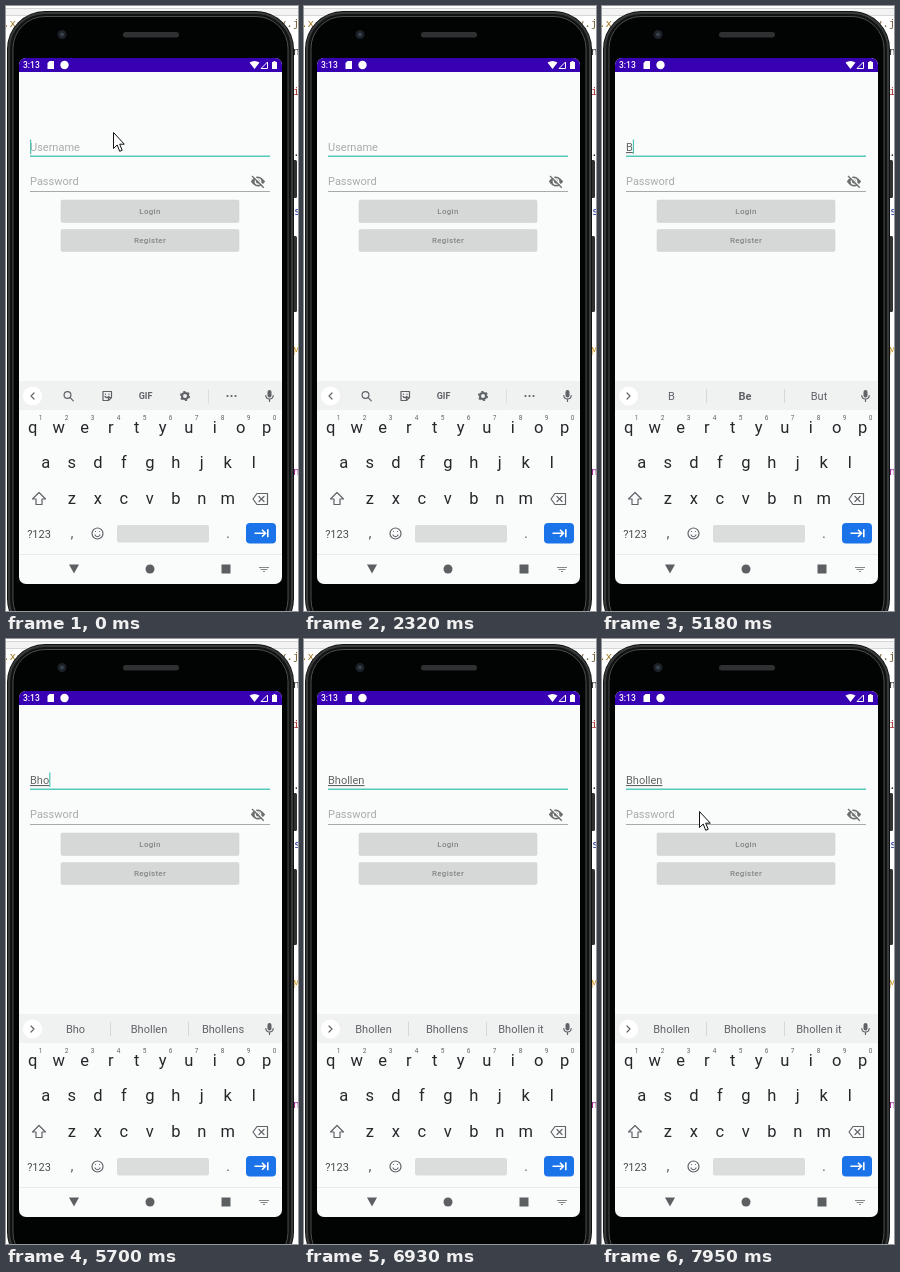
Recreate the animation shown at these times as an HTML page. Size 292 px wide and 605 px high, loop 8000 ms.

```html
<!DOCTYPE html>
<html lang="en">
<head>
<meta charset="utf-8">
<title>Login screen</title>
<style>
html, body { margin: 0; width: 100%; height: 100%; overflow: hidden; background: #fff; }
svg { display: block; width: 292px; height: 605px; font-family: Roboto, Arial, sans-serif; }
.mid { text-anchor: middle; }
.code { font: 11px "DejaVu Sans Mono", monospace; }
.line { fill: none; stroke: #5f6368; stroke-width: 1.2; stroke-linecap: round; stroke-linejoin: round; }
.btn { font-size: 8px; font-weight: 500; letter-spacing: .3px; fill: #858686; }
</style>
</head>
<body>
<svg viewBox="0 0 292 605">
  <defs>
    <clipPath id="screen"><rect x="13" y="52" width="263" height="526" rx="7"/></clipPath>
  </defs>

  <!-- editor behind the phone -->
  <rect width="292" height="605" fill="#fff"/>
  <rect y="2" width="292" height="7" fill="#f3f3f4"/>
  <path d="M0 2.500H292M0 9.500H292" stroke="#d5d6d8"/>
  <g class="code">
    <text x="-3" y="21" fill="#a07a28">.x</text>
    <text x="267" y="21" fill="#78643c">ty.j</text>
    <text x="287" y="49" fill="#333">n</text>
    <text x="287" y="89" fill="#a33">i</text>
    <text x="287" y="150" fill="#222">.</text>
    <text x="288" y="209" fill="#24359c">s</text>
    <text x="287" y="349" fill="#c99420">M</text>
    <text x="287" y="469" fill="#9b2393">n</text>
  </g>

  <!-- phone -->
  <rect x="286" y="154" width="5" height="38" rx="1.5" fill="#303232"/>
  <rect x="286" y="230" width="5" height="76" rx="1.5" fill="#303232"/>
  <rect x="1" y="5" width="287" height="626" rx="38" fill="#111212"/>
  <rect x="3" y="7" width="283" height="622" rx="36" fill="none" stroke="#37393a" stroke-width="2"/>
  <rect x="7" y="10.500" width="275" height="615" rx="32" fill="#020303" stroke="#4b4d4e"/>
  <circle cx="56" cy="28.500" r="4.500" fill="#1c2127"/>
  <circle cx="56" cy="28.500" r="2" fill="#37424d"/>
  <rect x="117" y="26" width="56" height="5.500" rx="2.700" fill="#2e3031"/>
  <g clip-path="url(#screen)">
    <rect x="13" y="52" width="263" height="526" fill="#fafcfb"/>
    <rect x="13" y="52" width="263" height="14" fill="#3700b3"/>
  </g>

  <!-- status bar -->
  <g fill="#fff">
    <text x="17" y="62" font-size="8.500" font-weight="500">3:13</text>
    <path d="M43.500 55H48V63H41.500V57Z"/>
    <circle cx="58.500" cy="59" r="4.200"/>
    <path d="M243.500 56.500Q248.500 53.500 253.500 56.500L248.500 63ZM266 56H267.500V55H269.500V56H271V63H266Z"/>
    <path d="M261.500 56V62.500H255Z" fill="none" stroke="#fff"/>
  </g>

  <!-- form -->
  <text id="user" x="24" y="145" font-size="11"/>
  <path d="M24 150.300H264" stroke="#55c9ba" stroke-width="1.400"/>
  <rect id="caret" y="133.500" width="1.200" height="14.500" fill="#4fc4b3"/>
  <text x="24" y="179" font-size="11" fill="#a9abab">Password</text>
  <path d="M24 185.500H264" stroke="#a8aaaa"/>
  <g fill="#6d6f6f">
    <path d="M244.800 175.500Q252 165.500 259.200 175.500Q252 185.500 244.800 175.500Z"/>
    <circle cx="252" cy="175.500" r="2.700" stroke="#fafcfb" stroke-width="1.300"/>
    <path d="M247 169.200L259 181.200" stroke="#fafcfb" stroke-width="1.300"/>
    <path d="M246 170L257.800 181.800" stroke="#6d6f6f" stroke-width="1.300"/>
  </g>
  <g fill="#d6d8d7" stroke="#cfd1d1" stroke-width=".5">
    <rect x="55" y="194" width="178" height="22.500" rx="1.500"/>
    <rect x="55" y="223.500" width="178" height="22" rx="1.500"/>
  </g>
  <text class="mid btn" x="144" y="208">Login</text>
  <text class="mid btn" x="144" y="237">Register</text>

  <!-- keyboard strip -->
  <rect x="13" y="375" width="263" height="29" fill="#f0f2f1"/>
  <circle cx="26.500" cy="390" r="9.500" fill="#fff"/>
  <path id="arrow" class="line"/>
  <g id="tools" class="line">
    <circle cx="61.500" cy="389" r="3.400"/><path d="M64.200 391.700L67.300 394.800"/>
    <path d="M97 385.500H105.500V391.500L102.500 394.500H97ZM105.500 391.500H102.500V394.500M99 390.500Q101 392.500 103 390.500M99.500 388V388.300M103 388V388.300"/>
    <circle cx="179" cy="390" r="3" stroke-width="2"/>
    <circle cx="179" cy="390" r="4.400" stroke-width="1.400" stroke-dasharray="2.300 2.308" stroke-linecap="butt"/>
    <path d="M202.500 384V397" stroke="#dcdede" stroke-width="1"/>
    <path d="M221.500 390h.01M225.500 390h.01M229.500 390h.01" stroke-width="2.200"/>
    <text class="mid" x="139.500" y="393" font-size="9" font-weight="700" fill="#5f6368" stroke="none">GIF</text>
  </g>
  <g id="words" class="mid" font-size="11" fill="#5f6368">
    <path d="M104.500 383V397M182.500 383V397" stroke="#d6d8d8"/>
    <text x="69.500" y="394"/><text x="143" y="394"/><text x="217" y="394"/>
  </g>
  <rect x="261.500" y="384" width="4" height="7.500" rx="2" fill="#5f6368"/>
  <path class="line" d="M259.800 389.500Q260 393 263.500 393T267.200 389.500M263.500 393V395.500"/>

  <!-- keys -->
  <g id="keys" class="mid" font-size="16.500" fill="#25282a"></g>
  <text class="mid" x="33" y="531.500" font-size="11" fill="#4a4d50">?123</text>
  <rect x="111" y="519" width="92" height="17.500" rx="2" fill="#dadddc"/>
  <rect x="240" y="517" width="30" height="20.500" rx="4" fill="#1a73e8"/>
  <path d="M248.500 527.200H259.500M256 523.700L259.500 527.200L256 530.700M261.800 523.200V531.200" fill="none" stroke="#fff" stroke-width="1.600"/>
  <g class="line">
    <path d="M33 486.500L39.500 493H36V498.500H30V493H26.500Z"/>
    <path d="M251 487.500H261.500V498.500H251L247 493ZM253 490.500L258 495.500M258 490.500L253 495.500"/>
    <circle cx="91.500" cy="527.500" r="5.500"/>
    <path d="M89 529Q91.500 532.500 94 529M89.500 525.500h.01M93.500 525.500h.01"/>
  </g>

  <!-- navigation bar -->
  <path d="M13 548.500H276" stroke="#e9ebea"/>
  <g fill="#5d6062">
    <path d="M63 558.500H73L68 567.500Z"/><circle cx="144" cy="563" r="4.500"/>
    <rect x="215.500" y="558.500" width="9" height="9"/>
  </g>
  <path d="M253 561.500H263M254.500 563.500H261.500M257 565.500H259" stroke="#85888a"/>

  <path id="pointer" d="M.5 .5V16.500L4.200 13L6.700 19.300L9.200 18.300L6.700 12.200H11.300Z" fill="#fff" stroke="#111"/>
</svg>
<script>
const $ = id => document.getElementById(id);
const LOOP = 8000, NAME = 'Bhollen', HIDDEN = -99;

// Each row: start time, then the values held until the next row.
const pointerAt = [
  [0, 107, 126], [150, 104, 132], [270, 100, 138], [390, 98, 140],
  [540, 98, 139], [660, 97, 139], [780, 98, 139], [1370, 97, 140],
  [1920, 271, 113], [2040, HIDDEN, 0],
  [7050, 147, 24], [7200, 148, 24], [7350, 136, 70], [7470, 119, 125],
  [7590, 105, 168], [7710, 99, 185], [7830, 98, 178], [7950, 97, 172]
];
const caretAt = [
  [0, 1], [270, 0], [660, 1], [2320, 0], [3820, 1], [4810, 0],
  [5060, 1], [6930, 0], [7470, 1], [7950, 0]
];
const typedAt = [
  [0, 0], [5060, 1], [5460, 2], [5580, 3], [5980, 4], [6260, 5], [6410, 6], [6560, 7]
];
const wordsAt = [
  [0], [5180, 'B', 'Be', 'But', 1], [5460, 'Bh', 'Be', 'But', 1],
  [5700, 'Bho', NAME, NAME + 's'], [5980, 'Bhol', NAME, NAME + 's'],
  [6260, 'Bholl', NAME, NAME + 's'], [6410, 'Bholle', NAME, NAME + 's', 1],
  [6560, NAME, NAME + 's', NAME + ' it']
];
const at = (rows, t) => rows.findLast(row => row[0] <= t).slice(1);

function label(x, y, text, size, fill) {
  const el = document.createElementNS('http://www.w3.org/2000/svg', 'text');
  el.setAttribute('x', x);
  el.setAttribute('y', y);
  if (size) el.setAttribute('font-size', size);
  if (fill) el.setAttribute('fill', fill);
  el.textContent = text;
  $('keys').append(el);
}
const keyRow = (letters, x, y) => [...letters].forEach((c, i) => label(x + i * 26, y, c));
keyRow('qwertyuiop', 26.7, 426.5);
keyRow('asdfghjkl', 39.8, 462);
keyRow('zxcvbnm', 65.8, 498);
[...'1234567890'].forEach((c, i) => label(34.7 + i * 26, 414, c, 6.5, '#5f6368'));
label(66, 532, ',', 15, '#5f6368');
label(222, 532, '.', 15, '#5f6368');

function draw(t) {
  const [x, y] = at(pointerAt, t);
  $('pointer').setAttribute('transform', `translate(${x} ${y})`);

  const [count] = at(typedAt, t), user = $('user');
  user.textContent = count ? NAME.slice(0, count) : 'Username';
  user.setAttribute('text-decoration', count ? 'underline' : 'none');
  const hover = t >= 1370 && t < 1520;
  user.setAttribute('fill', count ? '#646666' : hover ? '#777979' : '#a9abab');
  $('caret').setAttribute('x', count ? 24 + user.getComputedTextLength() : 24);
  $('caret').style.opacity = at(caretAt, t)[0];

  const words = at(wordsAt, t), open = words.length > 0;
  $('tools').style.display = open ? 'none' : '';
  $('words').style.display = open ? '' : 'none';
  $('arrow').setAttribute('d', open ? 'M25 387L28 390L25 393' : 'M28 387L25 390L28 393');
  $('words').querySelectorAll('text').forEach((el, i) => {
    el.textContent = words[i] || '';
    el.setAttribute('font-weight', i === 1 && words[3] === 1 ? 700 : 400);
  });
}

const start = performance.now();
function tick() {
  draw((performance.now() - start) % LOOP);
  requestAnimationFrame(tick);
}
tick();
</script>
</body>
</html>
```
